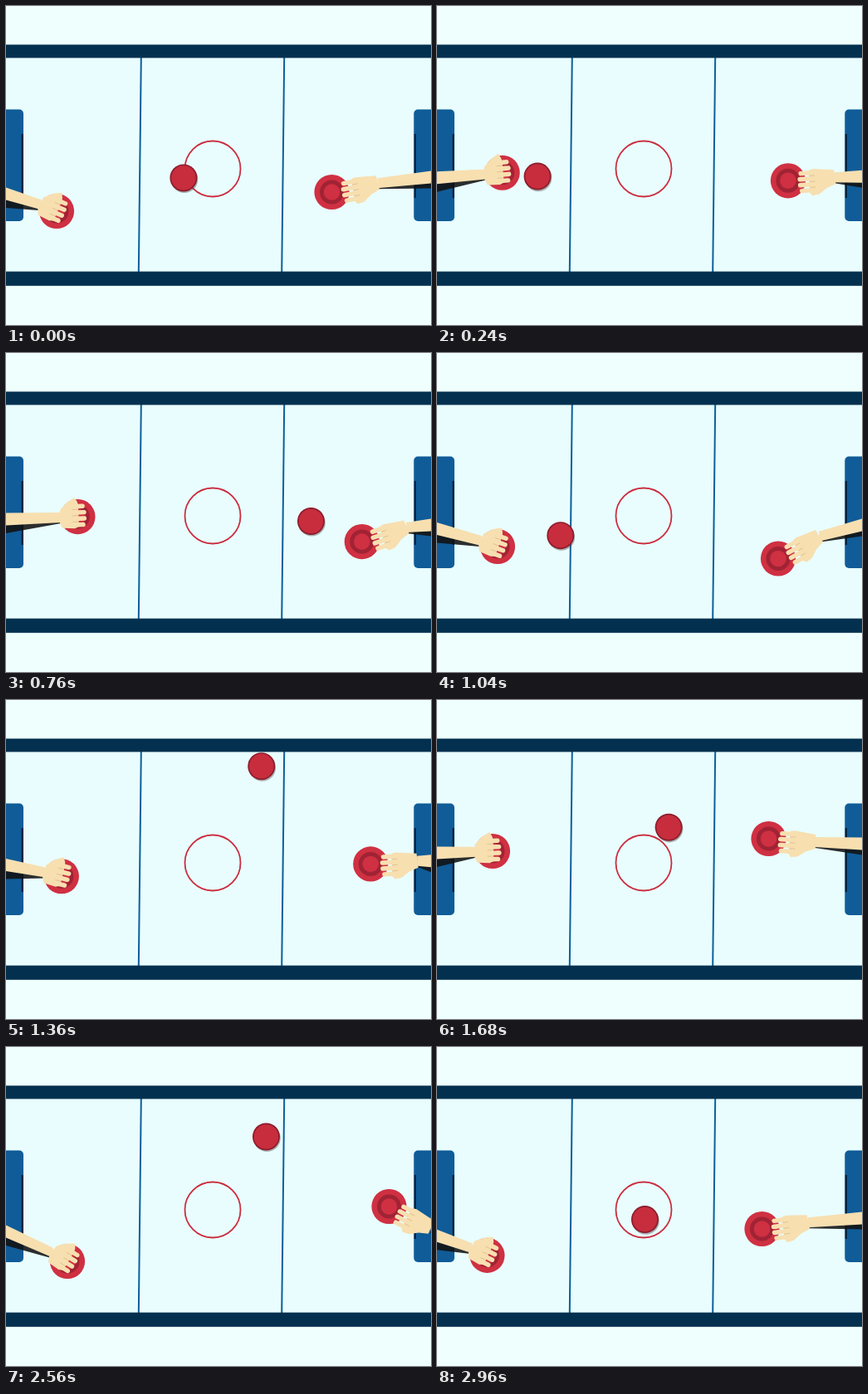
An HTML page with a canvas for the animation above (3000 ms loop, 512 by 384 pixels).

```html
<!DOCTYPE html>
<html>
<head>
<meta charset="utf-8">
<title>Air hockey</title>
<style>
html, body { margin: 0; width: 100%; height: 100%; overflow: hidden; background: #effffd; }
canvas { display: block; }
</style>
</head>
<body>
<canvas id="stage" width="512" height="384"></canvas>
<script>
const LOOP = 3000, STEP = 40, TOP = 79, BOTTOM = 304;
const SKIN = '#f7dfb0', CREASE = '#d9b98a', RED = '#cf3042', DARK_RED = '#a02334', NAVY = '#03304f', BLUE = '#105c98';
const c = document.getElementById('stage').getContext('2d');

// Mallet hits: time, x, y as if the puck had crossed the cushions, slow-down power of the next run
const hits = [
  [352, 118, 205, 3.5], [910, 370, -47, 3], [1180, 113, 222, 3],
  [1632, 362, 40, 3], [2000, 120, 221, 1.4], [2865, 372, 660, 3]
];

// poses: time, mallet x, mallet y, arm height at the stage edge
const left = {
  poses: [[0, 61, 247, 226], [480, 95, 165, 190], [1040, 73, 233, 211.5], [1680, 67, 182, 184], [2040, 89, 188, 197], [2560, 74, 258, 222]],
  edge: 0, twist: 1.2, wrist: -20, shadow: 10,
  palm: [[-21, -9], [-12, -18], [-3, -23], [0, -18], [1, -14], [1, 12], [-4, 14], [-19, 13], [-22, 6]],
  fingers: { base: -3, tip: 8, y: -12.5, gap: 7.4, bend: -0.8 }
};
const right = {
  poses: [[0, 392.5, 224, 206], [480, 443.5, 203, 205], [1040, 411, 247.5, 207], [1340, 440, 200, 195], [1680, 399.5, 167, 173], [2040, 450.5, 204, 210], [2560, 461.5, 192, 211], [2960, 391.5, 219, 206]],
  edge: 512, twist: 1.3, wrist: 56, shadow: 6.5,
  palm: [[26, -11], [31, -12], [56, -9], [57, 8], [46, 12], [36, 19], [28, 20], [25, 16]],
  fingers: { base: 29, tip: 14, y: -7.5, gap: 7, bend: 0.8 }
};

const lerp = (a, b, u) => a + (b - a) * u;

function around(keys, t) {
  const n = keys.length, i = keys.findLastIndex(k => k[0] <= t);
  return [-1, 0, 1, 2].map(d => {
    const [time, ...rest] = keys[(i + d + n) % n];
    return [time + LOOP * Math.floor((i + d) / n), ...rest];
  });
}

function bounce(y) {
  if (y > BOTTOM) y = 2 * BOTTOM - y;
  return y < TOP ? 2 * TOP - y : y;
}

function puckAt(t) {
  const [, a, b] = around(hits, t);
  const u = 1 - (1 - (t - a[0]) / (b[0] - a[0])) ** a[3];
  return [lerp(a[1], b[1], u), bounce(lerp(bounce(a[2]), b[2], u))];
}

// Smooth curve through the poses
function poseAt(poses, t) {
  const [p, a, b, q] = around(poses, t);
  const span = b[0] - a[0], u = (t - a[0]) / span;
  return [1, 2, 3].map(j => {
    const m = (b[j] - p[j]) / (b[0] - p[0]) * span;
    const n = (q[j] - a[j]) / (q[0] - a[0]) * span;
    const d = b[j] - a[j];
    return a[j] + u * (m + u * (3 * d - 2 * m - n + u * (m + n - 2 * d)));
  });
}

function rect(x, y, w, h, color) {
  c.fillStyle = color;
  c.fillRect(x, y, w, h);
}

function disc(x, y, r, color) {
  c.fillStyle = color;
  c.beginPath();
  c.arc(x, y, r, 0, 7);
  c.fill();
}

function poly(points, color) {
  c.fillStyle = color;
  c.beginPath();
  points.forEach(p => c.lineTo(...p));
  c.closePath();
  c.fill();
}

function line(x1, y1, x2, y2, width, color) {
  c.strokeStyle = color;
  c.lineWidth = width;
  c.beginPath();
  c.moveTo(x1, y1);
  c.lineTo(x2, y2);
  c.stroke();
}

function goal(x, radii, slotX) {
  c.fillStyle = BLUE;
  c.beginPath();
  c.roundRect(x, 124.5, 21, 134.5, radii);
  c.fill();
  rect(slotX, 154, 2.2, 77, '#04223c');
}

function table() {
  rect(0, 0, 512, 384, '#effffd');
  rect(0, 63, 512, 257, '#e9fdfe');
  c.lineCap = 'butt';
  for (const x of [162.8, 335.2]) line(x, 62, x - 3, 321, 2, '#0b609c');
  rect(0, 46.5, 512, 16, NAVY);
  rect(0, 319.6, 512, 17.2, NAVY);
  goal(0, [0, 5, 5, 0], 18.6);
  goal(491.3, [5, 0, 0, 5], 491.8);
  c.strokeStyle = '#cb2c3d';
  c.lineWidth = 1.8;
  c.beginPath();
  c.arc(249, 196, 33.5, 0, 7);
  c.stroke();
}

function puck([x, y]) {
  disc(x + 1, y + 1.8, 16.3, 'rgba(70,60,60,.4)');
  disc(x, y, 16.5, '#8b1c2c');
  disc(x, y, 14.8, '#c72d3d');
}

function player({ poses, edge, twist, wrist, shadow, palm, fingers: f }, t) {
  const [x, y, edgeY] = poseAt(poses, t);
  disc(x, y, 21.1, RED);
  disc(x, y, 14.5, DARK_RED);
  disc(x, y, 9.8, RED);

  // The hand follows the arm and bends a little further
  const a = Math.atan((edgeY - y) / (edge - x)) * twist;
  const wx = x + wrist * Math.cos(a), wy = y + wrist * Math.sin(a);
  poly([[wx, wy + 2], [edge, edgeY], [edge, edgeY + 7 + shadow], [wx, wy + 7]], 'rgba(18,18,18,.88)');
  poly([[wx, wy - 6], [edge, edgeY - 7.5], [edge, edgeY + 7.5], [wx, wy + 6]], SKIN);

  c.save();
  c.translate(x, y);
  c.rotate(a);
  poly(palm, SKIN);
  c.lineCap = 'round';
  for (let i = 0; i < 4; i++) {
    const fy = f.y + i * f.gap, tip = f.tip + f.bend * (i - 1.5) ** 2;
    line(f.base, fy, tip, fy, 5.4, SKIN);
    if (i) line(f.base - 3, fy - f.gap / 2, f.base + 3, fy - f.gap / 2, 0.7, CREASE);
  }
  c.restore();
}

function draw() {
  const t = Math.floor(performance.now() % LOOP / STEP) * STEP;
  table();
  puck(puckAt(t));
  player(left, t);
  player(right, t);
  requestAnimationFrame(draw);
}
draw();
</script>
</body>
</html>
```
